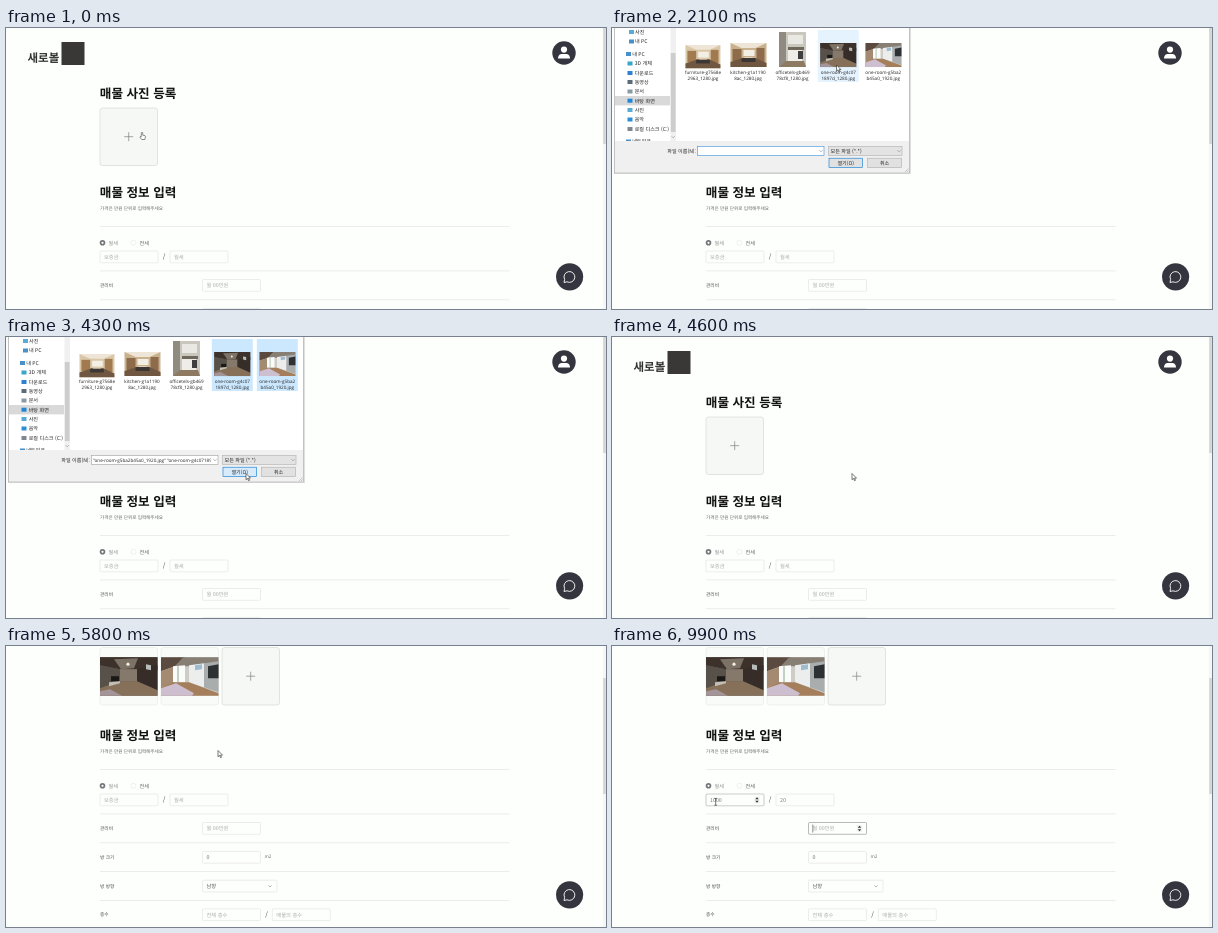
An HTML page for the animation above (10000 ms loop, 600x281 px).

```html
<!DOCTYPE html>
<html lang="ko">
<head>
<meta charset="utf-8">
<title>매물 등록</title>
<style>
  html, body { margin: 0; width: 100%; height: 100%; overflow: hidden; background: #fdfffc; }
  svg { display: block; width: 100%; height: 100%; }
  text { font-family: "Noto Sans CJK KR", "Noto Sans CJK", "Noto Sans", sans-serif; text-rendering: geometricPrecision; white-space: pre; }
  .latin { font-family: "Open Sans", "Noto Sans CJK KR", sans-serif; }
</style>
</head>
<body>
<svg id="stage" viewBox="0 0 600 281"></svg>
<script>
const LOOP = 10000, STEP = 100;
const DIALOG = [800, 4600], UPLOADED = 4700, SCROLL = [5500, 5800], SCROLL_BY = 78.5;
const PICKS = { 3: 2400, 4: 3300 };

// ---- markup helpers ----
const rect = (x, y, w, h, fill, stroke = 'none', more = '') =>
  `<rect x="${x}" y="${y}" width="${w}" height="${h}" fill="${fill}" stroke="${stroke}" stroke-width=".6" ${more}/>`;
const circle = (x, y, r, fill, stroke = 'none') =>
  `<circle cx="${x}" cy="${y}" r="${r}" fill="${fill}" stroke="${stroke}" stroke-width=".6"/>`;
const path = (d, fill, stroke = 'none', width = .7) =>
  `<path d="${d}" fill="${fill}" stroke="${stroke}" stroke-width="${width}"/>`;
// y is the middle of the line
const text = (x, y, size, str, fill = '#444', more = '') =>
  `<text x="${x}" y="${y + size * .37}" font-size="${size}" fill="${fill}" ${more}>${str}</text>`;
const group = (id, body, more = '') => `<g id="${id}" ${more}>${body}</g>`;

const title = (y, str) => text(93.8, y, 12.6, str, '#111', 'font-weight="700"');
const rule = y => path(`M94 ${y}H503.5`, 'none', '#e3e5e2');
const label = (y, str) => text(94, y, 4.7, str, '#4a4a4a');
const box = (x, y, w = 58) => rect(x, y - 6, w, 11.8, '#fdfffc', '#dfe1de', 'rx="1"');
const input = (x, y, hint, fill = '#adaeac') => box(x, y) + text(x + 4, y, 5.3, hint, fill);
const slash = (x, y) => text(x, y, 6.6, '/', '#444', 'text-anchor="middle"');
const plus = (x, y) => path(`M${x - 4.5} ${y}h9M${x} ${y - 4.5}v9`, 'none', '#808080');
const tile = (x, fill = '#f9fbf8', stroke = '#e5e7e4') => rect(x, 80, 57.5, 57.5, fill, stroke, 'rx="2.5"');
const chevron = (x, y) => path(`M${x - 1.6} ${y - .8}l1.6 1.6 1.6-1.6`, 'none', '#888', .6);

// ---- pictures ----
const darkRoom =
  rect(0, 0, 57.5, 38.5, '#5f564c') +
  path('M0 0H57.5V13L36 12H20L0 8Z', '#3c322b') +
  path('M14 2L38 1L34 11L21 12Z', '#7d7266') +
  path('M0 8L20 12V25L0 31Z', '#57514a') +
  path('M20 12H37V24H20Z', '#85796b') +
  path('M37 12L57.5 8V33L37 24Z', '#362d28') +
  path('M46 7l5 1v5l-5-1z', '#b9bdb9') + circle(28, 7, 1.6, '#f4efe2') +
  path('M0 31L20 24H37L57.5 33V38.5H0Z', '#86705a') +
  path('M0 34L10 32L22 38.5H0Z', '#a3949a') +
  rect(11, 19, 8, 5, '#1b1918') + path('M9 25l11-1v2l-11 3z', '#c4bfb6');
const brightRoom =
  rect(0, 0, 57.5, 38.5, '#cfccc6') +
  path('M0 0H24L14 9L0 14Z', '#5a4a3f') +
  path('M22 0H57.5V7L30 9H14Z', '#877e74') +
  path('M0 14L14 9V25L0 30Z', '#a48a70') +
  path('M12 9L24 8V25H12Z', '#fafcfb') + path('M17 9V25', 'none', '#8da588', 1) +
  path('M28 8L43 6V30L28 25Z', '#eceeee') + path('M34 8L41 7V12L34 13Z', '#9fbccf') +
  path('M43 6L57.5 4V35L43 30Z', '#a9adae') + path('M47 9L57.5 7V21L47 21Z', '#2e3134') +
  path('M12 25H28L57.5 36V38.5H0V30Z', '#a57f5c') +
  path('M0 31L15 26L33 36L31 38.5H0Z', '#cdbfd0');
const kitchen = (wood, wall) =>
  rect(0, 0, 36, 24, wall) + path('M0 0H36L25 5H11Z', '#eee5d6') +
  rect(2, 6, 9, 12, wood) + rect(13, 7, 11, 6, '#f4efe4') + rect(26, 5, 8, 14, wood) +
  path('M0 19L12 15H25L36 20V24H0Z', '#6f5742') + rect(11, 15, 14, 4, '#3d3733') + rect(14, 14, 8, 1, '#e3d4bd');
const office =
  rect(0, 0, 27, 35, '#c9c7be') + rect(0, 0, 7, 35, '#8f8b80') + rect(9, 3, 15, 9, '#e9e8e2') +
  rect(9, 15, 16, 3, '#70685d') + rect(9, 18, 14, 11, '#eeede8') + rect(19, 19, 5, 8, '#3f3e3e') +
  path('M7 29H25L27 35H0Z', '#8e7a62');
const place = (body, x, y, scale = 1) => `<g transform="translate(${x} ${y}) scale(${scale})">${body}</g>`;

// ---- page ----
const lower = [
  title(164, '매물 정보 입력'),
  text(94, 180.5, 4.6, '가격은 만원 단위로 입력해주세요', '#666'),
  [198.5, 242.9, 271.7, 300.5, 329.5].map(rule).join(''),
  circle(96.5, 214.8, 2.8, '#74767a') + circle(96.5, 214.8, 1.1, '#fff'),
  text(102.5, 214.8, 5.1, '월세', '#909090'),
  circle(127.5, 214.8, 2.5, '#fff', '#e4e6e3'), text(133.5, 214.8, 5.1, '전세', '#5c5c5c'),
  slash(158, 229), label(257.5, '관리비'),
  label(286, '방 크기'), input(196.5, 286.4, '0', '#777'), text(258.5, 285.6, 4.7, 'm2', '#777'),
  label(315, '방 방향'), box(196.5, 315.2, 74.5), text(200.5, 315.2, 5.3, '남향', '#5c5c5c'), chevron(264, 315.2),
  label(343.6, '층수'), input(196.5, 343.8, '전체 층수'), slash(260.5, 343.8), input(266.3, 343.8, '매물의 층수')
].join('');

const FIELDS = [
  { x: 94, y: 229, hint: '보증금', from: 6200, to: 8300, value: '1000', keys: [7500, 7700, 7900, 8100] },
  { x: 164, y: 229, hint: '월세', from: 8300, to: 9700, value: '20', keys: [9200, 9400] },
  { x: 196.5, y: 257.5, hint: '월 00만원', from: 9700, to: LOOP, value: '', keys: [] }
];
const CARET_OFF = [[6400, 6600], [7000, 7500], [8900, 9200]];
const field = ({ x, y, hint }, i) =>
  input(x, y, hint).replace('<text', `<text id="value${i}"`) +
  group('ring' + i, rect(x, y - 6, 58, 11.8, 'none', '#96989c', 'rx="1"')) +
  group('spin' + i, rect(x + 48.5, y - 3.5, 5, 7, '#f0f1ef') +
    path(`M${x + 49.3} ${y - .8}l1.7-2 1.7 2zM${x + 49.3} ${y + .8}l1.7 2 1.7-2z`, '#333'));

const page =
  text(21.5, 30, 11.5, '새로볼', '#333', 'font-weight="700"') + rect(55.5, 14, 23, 23, '#3a3837') +
  circle(558, 25, 11.7, '#35353f') + circle(558, 21.6, 3.1, '#fff') +
  path('M552 30.6c0-3.4 2-4.7 4-4.7h4c2 0 4 1.3 4 4.7z', '#fff') +
  title(65, '매물 사진 등록') +
  group('photos', tile(94) + tile(155) + place(darkRoom, 94, 89.7) + place(brightRoom, 155, 89.7)) +
  group('adder', tile(94, '#f6f8f5', '#d2d4d1') + plus(122.7, 108.7)) +
  group('lower', lower + FIELDS.map(field).join('') + group('caret', path('M0 -4V4', 'none', '#444', .6)));

// ---- file dialog ----
const FILES = [
  [91, 'furniture-g7568e', '2963_1280.jpg', place(kitchen('#a17a4f', '#d9c7a8'), 73.5, 17, .97)],
  [136, 'kitchen-g1a1190', '8ac_1280.jpg', place(kitchen('#8d6b4b', '#c9b18e'), 118.5, 15)],
  [180.5, 'officetels-gb469', '78cf8_1280.jpg', place(office, 167, 4)],
  [226.3, 'one-room-g4c07', '1897d_1280.jpg', place(darkRoom, 208.3, 15, .625)],
  [271.3, 'one-room-g5ba2', 'b45a0_1920.jpg', place(brightRoom, 253.5, 15, .625)]
];
const mid = 'text-anchor="middle" class="latin"';
const file = ([x, a, b, picture], i) =>
  rect(x - 20.5, 2, 41, 52, '#cce8ff', 'none', `id="back${i}"`) + picture +
  text(x, 44, 4.6, a, '#222', mid) + text(x, 50.3, 4.6, b, '#222', mid);

const PLACES = [
  [4, '사진', '#5aa9d6', 1], [13.5, '내 PC', '#4a90c8', 1], [26, '내 PC', '#4a90c8', -1], [35.5, '3D 개체', '#38a5c9'],
  [45, '다운로드', '#2f80d0'], [54, '동영상', '#5b6b78'], [63.5, '문서', '#8a9aa5'], [72.7, '바탕 화면', '#1f86d8'],
  [82, '사진', '#5aa9d6'], [91.5, '음악', '#2c8fd6'], [101, '로컬 디스크 (C:)', '#7f8890'], [113.5, '네트워크', '#4a90c8', -1]
];
const sidebar = PLACES.map(([y, name, color, indent = 0]) =>
  rect(15.5 + indent * 1.5, y - 2, 5, 4, color) + text(22.7 + indent * (indent < 0 ? 2.5 : .3), y, 5.1, name, '#222')).join('');

const dialog =
  rect(2, -10, 297, 156, '#000', 'none', 'opacity=".12"') +
  rect(2.5, -10, 295, 155, '#f0f0f0', '#a9a9a9') + rect(3, -10, 294, 123, '#fff') +
  rect(3, 68, 55, 9.4, '#d9d9d9') +
  `<g clip-path="url(#listClip)">${sidebar}</g>` +
  rect(58.5, -10, 5.5, 123, '#f0f0f0') + rect(58.8, 25, 4.8, 79, '#cdcdcd') + chevron(61.2, 109) +
  FILES.map(file).join('') +
  text(84, 123, 5.1, '파일 이름(N):', '#222', 'text-anchor="end"') +
  rect(85.5, 118.5, 126.5, 9, '#fff', '#0078d7', 'id="nameBox"') + chevron(209, 123) +
  `<g clip-path="url(#nameClip)">${text(87, 122.8, 4.6, '', '#222', 'id="fileName" class="latin"')}</g>` +
  rect(216.5, 118.5, 73.5, 9, '#e3e3e3', '#b0b0b0') + text(218.5, 123, 5.1, '모든 파일 (*.*)', '#222') + chevron(287, 123) +
  rect(217, 130.2, 33.5, 9.2, '#e1e1e1', '#0078d7', 'id="openButton"') + text(233.7, 134.8, 5.1, '열기(O)', '#222', 'text-anchor="middle"') +
  rect(255.7, 130.2, 33.8, 9.2, '#e1e1e1', '#adadad') + text(272.6, 134.8, 5.1, '취소', '#222', 'text-anchor="middle"') +
  path('M296.5 140.5l-3.5 3.5M296.5 142.5l-1.5 1.5', 'none', '#aaa', .6);

// ---- fixed parts and pointer ----
const fixed =
  rect(596.8, 0, 3.2, 281, '#f5f7f4') + rect(597.2, 0, 2.6, 116, '#d3d5d2', 'none', 'id="thumb"') +
  circle(563.6, 248.8, 13.6, '#35353f') +
  path('M558.6 251.4a5.4 5.4 0 1 1 2.4 2.4l-3 .7z', 'none', '#fff', .9);
const pointer =
  group('arrow', path('M0 0V6.2L1.5 4.9L2.5 7.2L3.5 6.8L2.5 4.6H4.5Z', '#fff', '#222', .6)) +
  group('hand', path('M-.7 4.8V.7Q0-.3 .7 .7V3.2L3 3.7Q3.7 4 3.4 5L2.8 7.5H-.3L-2.2 5Q-2 4.1-.7 4.8Z', '#fff', '#444', .6)) +
  group('beam', path('M-1.3-3.3H1.3M0-3.3V3.5M-1.3 3.5H1.3', 'none', '#222', .6));

document.getElementById('stage').innerHTML =
  `<defs><clipPath id="listClip"><rect x="3" y="0" width="55" height="113"/></clipPath>
   <clipPath id="nameClip"><rect x="86" y="118" width="119" height="10"/></clipPath></defs>` +
  rect(0, 0, 600, 281, '#fdfffc') + group('page', page) + fixed + group('dialog', dialog) + group('pointer', pointer);

// ---- motion ----
const MOVES = [
  [0, 136, 104], [800, 136, 104], [1600, 203, 62], [1800, 203, 62], [2100, 224.5, 37], [2400, 224.5, 37],
  [3300, 268, 36], [3500, 268, 36], [4300, 240, 136.5], [4600, 240, 136.5], [5000, 247, 84.5],
  [5500, 247, 84.5], [5800, 212, 104.5], [6200, 103.7, 155.7], [LOOP, 103.7, 155.7]
];
const $ = id => document.getElementById(id);
const set = (id, name, value) => $(id).setAttribute(name, value);
const show = (id, on) => set(id, 'visibility', on ? 'inherit' : 'hidden');
const clamp = v => Math.min(1, Math.max(0, v));
const within = (t, [from, to]) => t >= from && t < to;
const shift = (id, x, y) => set(id, 'transform', `translate(${x} ${y})`);

function pointerAt(t) {
  const i = MOVES.findIndex(m => m[0] > t);
  const [t0, x0, y0] = MOVES[i - 1], [t1, x1, y1] = MOVES[i];
  const k = (t - t0) / (t1 - t0), e = k * k * (3 - 2 * k);
  return [x0 + (x1 - x0) * e, y0 + (y1 - y0) * e];
}

function drawDialog(t, x, y) {
  show('dialog', within(t, DIALOG));
  FILES.forEach(([cx], i) => {
    const picked = t >= PICKS[i], hover = Math.abs(x - cx) < 20.5 && y < 54;
    show('back' + i, picked || hover);
    set('back' + i, 'fill', picked ? '#cce8ff' : '#e5f3ff');
  });
  const [first, second] = [FILES[3], FILES[4]].map(f => f[1] + f[2]);
  $('fileName').textContent = t >= PICKS[4] ? `"${second}" "${first}"` : t >= PICKS[3] ? first : '';
  set('nameBox', 'stroke', t < PICKS[3] ? '#3b93dc' : '#a0a0a0');
  set('openButton', 'fill', x > 217 && x < 250 && y > 130 ? '#d8ebfa' : '#e1e1e1');
}

function drawFields(t) {
  FIELDS.forEach((f, i) => {
    const focused = within(t, [f.from, f.to]), hovered = i === 0 && t >= f.from;
    const typed = f.value.slice(0, f.keys.filter(k => t >= k).length);
    $('value' + i).textContent = typed || f.hint;
    set('value' + i, 'fill', typed ? '#808080' : '#adaeac');
    const ramp = clamp((t - f.from + 100) / 200), fade = clamp((t - f.to + 100) / 200);
    const rest = hovered ? .6 : 0;
    set('ring' + i, 'opacity', focused ? ramp : t < f.from ? 0 : 1 - fade * (1 - rest));
    show('spin' + i, focused || hovered);
    if (focused) shift('caret', f.x + 4.3 + typed.length * 2.95, f.y);
  });
  show('caret', t >= FIELDS[0].from && !CARET_OFF.some(span => within(t, span)));
}

function draw(t) {
  const [x, y] = pointerAt(t), uploaded = t >= UPLOADED;
  const scroll = clamp((t - SCROLL[0] + STEP) / (SCROLL[1] - SCROLL[0] + STEP));
  shift('page', 0, -SCROLL_BY * scroll);
  shift('thumb', 0, 32 * scroll);
  shift('lower', 0, uploaded ? 3.5 : 0);
  shift('adder', uploaded ? 122 : 0, 0);
  show('photos', uploaded);
  drawDialog(t, x, y);
  drawFields(t);
  const shape = t < 100 || within(t, [4800, 5500]) ? 'hand' : t >= 6200 ? 'beam' : 'arrow';
  ['arrow', 'hand', 'beam'].forEach(id => show(id, id === shape));
  shift('pointer', x, y);
}

const start = performance.now();
function tick() {
  const t = (performance.now() - start) % LOOP;
  draw(Math.floor(t / STEP) * STEP);
  requestAnimationFrame(tick);
}
tick();
</script>
</body>
</html>
```
